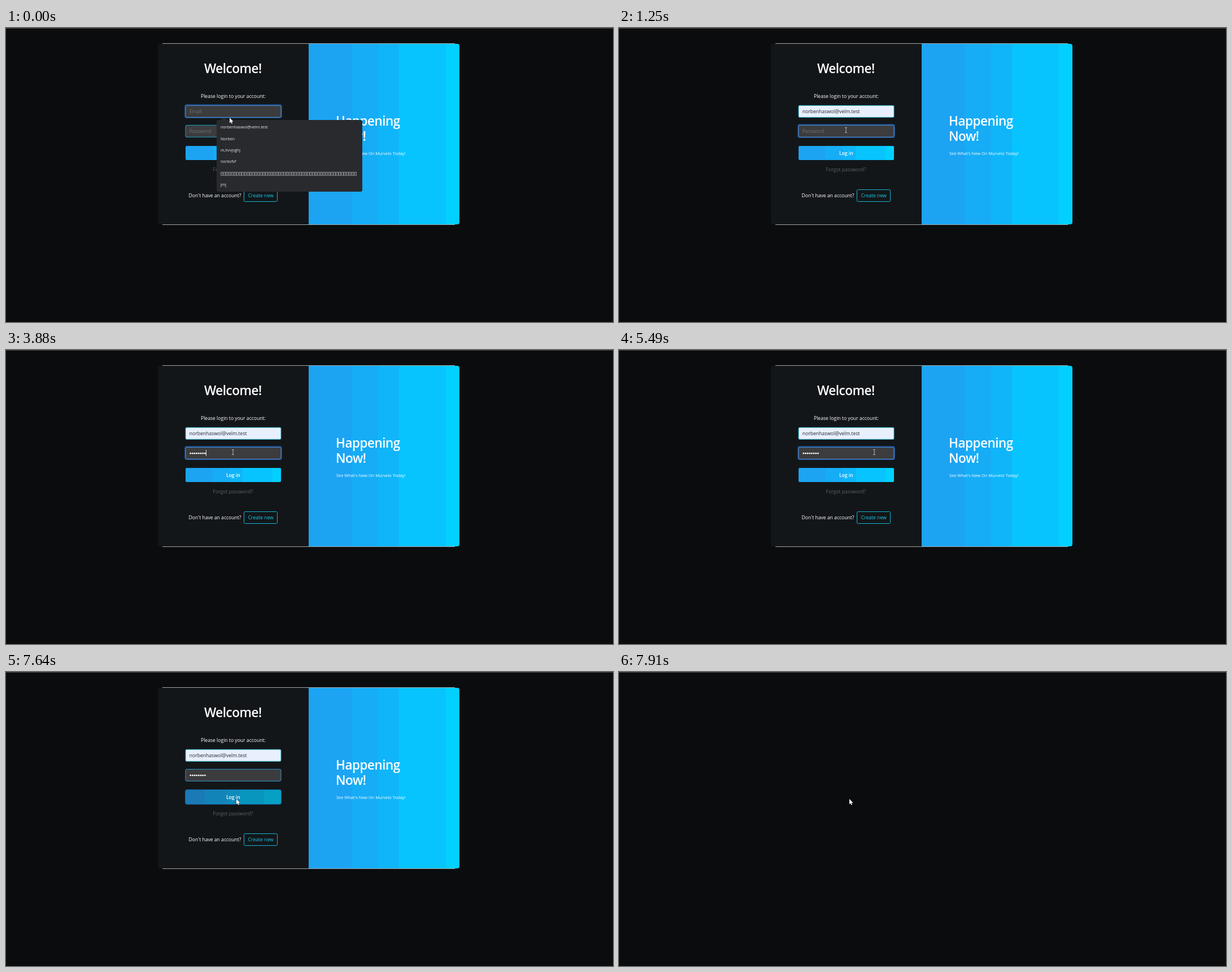
Animation of 1075x521 px, one loop 8 s. Source, as an HTML page with a canvas:

```html
<!DOCTYPE html>
<html lang="en">
<head>
<meta charset="utf-8">
<title>Login</title>
<style>
  html, body { margin: 0; width: 100%; height: 100%; overflow: hidden; background: #0b0c0e; }
  canvas { display: block; }
</style>
</head>
<body>
<canvas id="stage" width="1075" height="521"></canvas>
<script>
const LOOP = 8000;
const EMAIL = 'norbenhaswol@velm.test';
const ROWS = [EMAIL, 'Norben', 'm,hvvjvghj', 'norbvfvf', '[]'.repeat(52), 'jmj'];
const BRIGHT = [[0, '#1ca4f3'], [.285, '#16acf6'], [.46, '#10b5f9'], [.6, '#08c4fe'], [.91, '#02d0ff']];
const DARK = [[0, '#1a7ab5'], [.2, '#1384b8'], [.43, '#0e8cbb'], [.57, '#0896be'], [.82, '#05a0c4']];

// time, x, y, pointer shape
const CURSOR = [
  [0, 396, 159, 'arrow'], [150, 399, 179, 'arrow'], [420, 401, 180, 'arrow'], [840, 402, 181, 'beam'],
  [5490, 452, 181, 'beam'], [5610, 505, 169, 'arrow'], [5730, 543, 153, 'arrow'], [5850, 561, 143, 'arrow'],
  [5970, 553, 148, 'arrow'], [6120, 534, 172, 'arrow'], [6260, 529, 177, 'arrow'], [6420, 528, 178, 'arrow'],
  [6570, 525, 184, 'arrow'], [6690, 512, 195, 'arrow'], [6840, 458, 212, 'arrow'], [6960, 404, 219, 'arrow'],
  [7110, 408, 225, 'arrow']
];
const KEYS = [1940, 2490, 2620, 2920, 3040, 3320, 3480, 3880];
const CARET = [[840, 1], [1250, 0], [1790, 1], [2350, 0], [2490, 1], [4470, 0], [4930, 1],
  [5490, 0], [5970, 1], [6570, 0], [6960, 1], [7510, 0]];

const c = document.getElementById('stage').getContext('2d');
const at = (list, t) => list.filter(k => k[0] <= t).pop();

function rect(x, y, w, h, fill, r = 0) {
  c.beginPath();
  c.roundRect(x, y, w, h, r);
  c.fillStyle = fill;
  c.fill();
}

function outline(x, y, w, h, color, r = 2, width = 1) {
  c.beginPath();
  c.roundRect(x, y, w, h, r);
  c.lineWidth = width;
  c.strokeStyle = color;
  c.stroke();
}

function text(s, x, y, size = 8.6, color = '#fff', weight = 400, align = 'left', spacing = 0) {
  c.font = `${weight} ${size}px "Open Sans", "Noto Sans", sans-serif`;
  c.letterSpacing = spacing + 'px';
  c.textAlign = align;
  c.fillStyle = color;
  c.fillText(s, x, y);
}

function bands(x, w, stops) {
  const g = c.createLinearGradient(x, 0, x + w, 0);
  stops.forEach(([p, color], i) => {
    g.addColorStop(p, color);
    g.addColorStop(i + 1 < stops.length ? stops[i + 1][0] : 1, color);
  });
  return g;
}

function field(y, filled, focused, border = '#17a2b8') {
  if (focused) outline(317, y - 1, 171, 23, 'rgba(20,95,190,.6)', 3, 2);
  rect(318, y, 169, 21.5, filled ? '#e8f0fe' : '#3c3c3e', 2);
  outline(318, y + .3, 169, 21, focused ? '#5796e0' : border);
}

function button(t) {
  const hover = t >= 6840;
  if (t >= 7510) outline(317.5, 208.5, 170, 26, 'rgba(30,120,205,.75)', 3);
  rect(318, 209, 169, 25, bands(318, 169, hover ? DARK : BRIGHT), 2);
  text('Log in', 402.3, 224.6, 8.6, '#fff', 600, 'center');
}

function card() {
  rect(277, 27, 518, 322, '#a3a7aa');
  rect(269, 28, 267, 320, '#131619', [4, 0, 0, 4]);
  rect(536, 28, 267, 320, bands(536, 267, BRIGHT), [0, 4, 4, 0]);
  text('Welcome!', 351, 80, 22.5, '#fff', 600, 'left', -.5);
  text('Please login to your account:', 345, 124.2);
  text('Forgot password?', 366.6, 253.5, 8.6, '#5c6166');
  text("Don't have an account?", 323.6, 300.3);
  outline(421.5, 286.5, 59, 21, '#14b5d2');
  text('Create new', 451.2, 300.3, 8.6, '#16cdee', 400, 'center');
  text('Happening', 584, 172.5, 22.5, '#fff', 600, 'left', -.5);
  text('Now!', 584, 199.5, 22.5, '#fff', 600, 'left', -.5);
  text("See What's New On Murvelo Today!", 585, 224.6, 7.44);
}

function form(t) {
  const filled = t >= 150;
  field(137, filled, t < 840);
  text(filled ? EMAIL : 'Email', 324.7, 151.2, 8.6, filled ? '#25282c' : '#6d7073');
  if (t >= 420 && t < 840) rect(427.4, 142, 1, 12, '#222');

  field(172, false, t >= 840 && t < 7510, t >= 7510 ? '#3295c8' : undefined);
  const typed = KEYS.filter(k => k <= t).length;
  if (!typed) text('Password', 324.7, 186.2, 8.6, '#6d7073');
  for (let i = 0; i < typed; i++) {
    c.beginPath();
    c.arc(326.8 + i * 3.66, 183.2, 1.35, 0, 7);
    c.fillStyle = '#fff';
    c.fill();
  }
  const caret = at(CARET, t);
  if (caret && caret[1]) rect(Math.floor(325 + typed * 3.66), 177, 1, 11, '#e4e4e4');
  button(t);
}

function menu(t) {
  if (t >= 690) return;
  const [, alpha, scale] = at([[0, 1, 1], [420, .7, .985], [570, .26, .957]], t);
  c.save();
  c.globalAlpha = alpha;
  c.translate(502, 226.5);
  c.scale(scale, scale);
  c.translate(-502, -226.5);
  c.fillStyle = '#292a2d';
  c.beginPath();
  c.roundRect(373, 163, 258, 127, 3);
  c.moveTo(380, 163);
  c.lineTo(384, 160);
  c.lineTo(388, 160);
  c.lineTo(392, 163);
  c.fill();
  if (t >= 150 && t < 420) rect(373, 166, 258, 20, '#3f4043');
  ROWS.forEach((s, i) => text(s, 380, 178.2 + i * 20.35, 7.05, '#e8eaed'));
  c.restore();
}

function pointer(t) {
  const [, x, y, shape] = at(CURSOR, t);
  if (shape === 'beam') {
    rect(x - .5, y - 4, 1, 9, '#b8b8b8');
    rect(x - 2, y - 5, 4, 1, '#a8a8a8');
    rect(x - 2, y + 4, 4, 1, '#a8a8a8');
    return;
  }
  c.save();
  c.translate(x, y);
  c.beginPath();
  [[0, 0], [0, 9.5], [2.2, 7.5], [3.7, 10.8], [5.1, 10.1], [3.7, 7], [6.5, 6.7]]
    .forEach(p => c.lineTo(...p));
  c.closePath();
  c.lineWidth = .8;
  c.strokeStyle = '#111';
  c.stroke();
  c.fillStyle = '#fff';
  c.fill();
  c.restore();
}

function draw(now) {
  const t = now % LOOP;
  rect(0, 0, 1075, 521, '#0b0c0e');
  rect(0, 0, 1075, 1, '#47494b');
  if (t < 7780) {
    card();
    form(t);
    menu(t);
  }
  pointer(t);
}

const start = performance.now();
function tick() {
  draw(performance.now() - start);
  requestAnimationFrame(tick);
}
tick();
</script>
</body>
</html>
```
